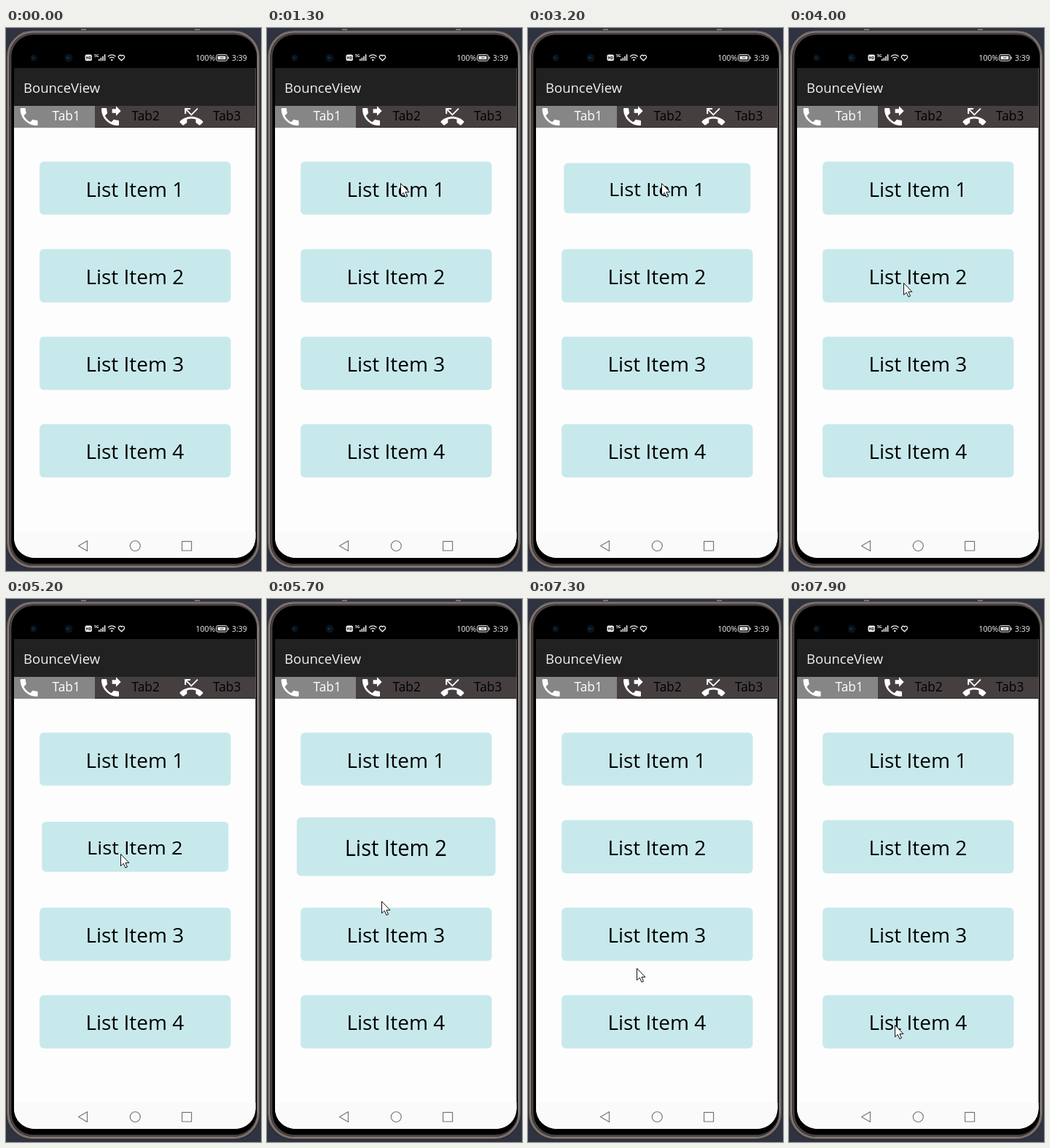
Animation, 350 px wide and 746 px high, one loop 8 s. Source, as an HTML page:

```html
<!DOCTYPE html>
<html lang="en">
<head>
<meta charset="utf-8">
<title>Bouncing list</title>
<style>
  html, body { margin: 0; width: 100%; height: 100%; overflow: hidden; background: #2f3341; }
  svg { display: block; width: 350px; height: 746px; font-family: "Open Sans", "Noto Sans", sans-serif; font-weight: 500; }
</style>
</head>
<body>
<svg viewBox="0 0 350 746">
  <defs>
    <clipPath id="screen"><path d="M11 8H342.5V700a28 28 0 0 1-28 28H39a28 28 0 0 1-28-28z"/></clipPath>
    <path id="handset" d="M6.62 10.79c1.44 2.83 3.76 5.14 6.59 6.59l2.2-2.2c.27-.27.67-.36 1.02-.24 1.12.37 2.33.57 3.57.57.55 0 1 .45 1 1V20c0 .55-.45 1-1 1-9.39 0-17-7.61-17-17 0-.55.45-1 1-1h3.5c.55 0 1 .45 1 1 0 1.25.2 2.45.57 3.57.11.35.03.74-.25 1.02z"/>
  </defs>

  <!-- phone body -->
  <rect width="350" height="746" fill="#2f3341"/>
  <path d="M103 2.5h7M259 2.5h7" stroke="#8d8583" stroke-width="2"/>
  <rect x="0" y="3" width="349" height="740" rx="36" fill="#2a2626"/>
  <g fill="none">
    <rect x="2.5" y="5" width="344" height="735.5" rx="34" stroke="#6f6765" stroke-width="3"/>
    <rect x="3.5" y="6" width="342" height="733.5" rx="33" stroke="#9a918e"/>
    <rect x="6" y="8" width="337.5" height="729.5" rx="31" stroke="#474140" stroke-width="3"/>
  </g>
  <rect x="7.5" y="9.5" width="336.5" height="726.5" rx="30" fill="#000"/>

  <g clip-path="url(#screen)">
    <rect x="11" y="55" width="332" height="673" fill="#fdfdfd"/>
    <rect x="11" y="692" width="332" height="36" fill="#fafafa"/>
    <rect x="11" y="55" width="332" height="52" fill="#212121"/>
    <rect x="11" y="107" width="332" height="30" fill="#453f40"/>
    <rect x="11" y="107" width="111" height="30" fill="#868686"/>
    <path d="M122 136.5h221" stroke="#2b2728"/>
  </g>

  <!-- status bar -->
  <g fill="#07131d"><circle cx="38" cy="41" r="4.5"/><circle cx="86" cy="41" r="5.5"/></g>
  <g fill="#143044"><circle cx="37" cy="41" r="1.4"/><circle cx="85" cy="41" r="1.8"/></g>
  <rect x="108.5" y="36.5" width="9.5" height="8.5" rx="2" fill="#f2f2f2"/>
  <g font-weight="700">
    <text x="109.7" y="43" font-size="5">HD</text>
    <text x="121" y="39.8" font-size="5" fill="#eee">5G</text>
  </g>
  <path d="M127.8 45v-2.5M130.4 45v-4.2M133 45v-6.3M135.6 45v-8.8" stroke="#eee" stroke-width="1.6"/>
  <g fill="none" stroke="#eee" stroke-width="1.3">
    <path d="M140 39.2q5.3-4.6 10.6 0M142 41.6q3.3-2.8 6.6 0"/>
    <path d="M158.5 44.8l-3.6-3.6a2.3 2.3 0 0 1 3.6-2.9 2.3 2.3 0 0 1 3.6 2.9z"/>
    <rect x="288.6" y="36.6" width="15" height="8.6" rx="2.3" stroke-width="1"/>
  </g>
  <circle cx="145.3" cy="44" r="1.2" fill="#eee"/>
  <path d="M290.5 38.5h11v4.8h-11zM304.6 39.4h1.3v3h-1.3z" fill="#e8e8e8"/>
  <path d="M294 41h4.5" stroke="#444"/>
  <g font-size="10.5" fill="#f4f4f4">
    <text x="260.5" y="44.6">100%</text>
    <text x="310" y="44.6">3:39</text>
  </g>

  <!-- title and tabs -->
  <text x="24" y="89" font-size="18.5" fill="#f0f0f0">BounceView</text>
  <g fill="#fff">
    <use href="#handset" transform="translate(15.6 106) scale(1.333)"/>
    <g transform="translate(127 106) scale(1.333)">
      <use href="#handset"/>
      <path d="M18 11l5-5-5-5v3h-4v4h4z"/>
    </g>
    <path transform="translate(238.6 106) scale(1.32)" d="M6.5 5.5L12 11l7-7-1-1-6 6-4.5-4.5H11V3H5v6h1.5zm17.21 11.17C20.66 13.78 16.54 12 12 12S3.34 13.78.29 16.67a1 1 0 0 0 0 1.42l2.48 2.48a1 1 0 0 0 1.41.01c.79-.74 1.69-1.36 2.66-1.85.33-.16.56-.5.56-.9v-3.1a14.7 14.7 0 0 1 9.2 0v3.1c0 .39.23.74.56.9.98.49 1.87 1.12 2.67 1.85a1 1 0 0 0 1.41-.01l2.48-2.48a1 1 0 0 0 0-1.42z"/>
  </g>
  <g font-size="17.3">
    <text x="63.5" y="126.5" fill="#fff">Tab1</text>
    <text x="172.5" y="126.5">Tab2</text>
    <text x="284" y="126.5">Tab3</text>
  </g>

  <g id="list"></g>

  <!-- navigation bar -->
  <g fill="none" stroke="#777" stroke-width="1.2" stroke-linejoin="round">
    <path d="M99.5 711.5l12-7v14z"/>
    <circle cx="177.3" cy="711.5" r="7"/>
    <rect x="241.6" y="705.4" width="13" height="12.6"/>
  </g>

  <path id="cursor" d="M0 0V16.2L3.8 12.8 6.4 18.8 9 17.7 6.4 11.9H11.4Z" fill="#fff" stroke="#111" stroke-linejoin="round"/>
</svg>

<script>
const LOOP = 8000, STEP = 100;
const CENTER_X = 177.3;
const PRESSED = -0.6, POPPED = 1;

// [time, x, y]; the pointer is hidden before the first key
const pointerKeys = [
  [500, 62, 243], [800, 130, 196], [1100, 183, 213], [3600, 183, 213], [3700, 174, 245],
  [4000, 157, 350], [5200, 157, 350], [5600, 157, 415], [5700, 157, 415], [6000, 157, 440],
  [6500, 157, 440], [6900, 148, 568], [7100, 146, 574], [7200, 146, 574],
  [7400, 152, 440], [7500, 152, 345], [7600, 152, 345], [7900, 145, 585]
];

// [time, bounce] per list item, 0 is at rest
const bounceKeys = [
  [[2800, 0], [2900, PRESSED], [3200, PRESSED], [3400, POPPED], [3600, 0]],
  [[4900, 0], [5000, PRESSED], [5500, PRESSED], [5700, POPPED], [5900, 0]],
  [[6500, 0], [6600, PRESSED], [6700, PRESSED], [6900, 0],
   [7300, 0], [7400, PRESSED], [7500, PRESSED], [7600, POPPED], [7800, 0]],
  [[0, 0]]
];

function sample(keys, time) {
  const next = keys.findIndex(key => key[0] > time);
  if (next === 0) return keys[0].slice(1);
  if (next < 0) return keys[keys.length - 1].slice(1);
  const from = keys[next - 1], to = keys[next];
  const part = (time - from[0]) / (to[0] - from[0]);
  const eased = (1 - Math.cos(Math.PI * part)) / 2;
  return from.slice(1).map((value, i) => value + (to[i + 1] - value) * eased);
}

const list = document.getElementById("list");
const cursor = document.getElementById("cursor");
list.innerHTML = bounceKeys.map((_, i) => `<g>
  <rect x="-131.2" y="-36.6" width="262.4" height="73.2" rx="6" fill="#c8e9ec"/>
  <text x="-.5" y="11.5" font-size="28" text-anchor="middle">List Item ${i + 1}</text></g>`).join("");

function draw(now) {
  const time = Math.floor(now % LOOP / STEP) * STEP;
  [...list.children].forEach((item, i) => {
    const [bounce] = sample(bounceKeys[i], time);
    item.setAttribute("transform",
      `translate(${CENTER_X} ${220 + i * 120.3}) scale(${1 + 0.04 * bounce} ${1 + 0.1 * bounce})`);
  });
  const [x, y] = sample(pointerKeys, time);
  cursor.setAttribute("transform", `translate(${x + 0.5} ${y + 0.5})`);
  cursor.setAttribute("visibility", time < pointerKeys[0][0] ? "hidden" : "visible");
}

const start = performance.now();
function tick() {
  draw(performance.now() - start);
  requestAnimationFrame(tick);
}
tick();
</script>
</body>
</html>
```
